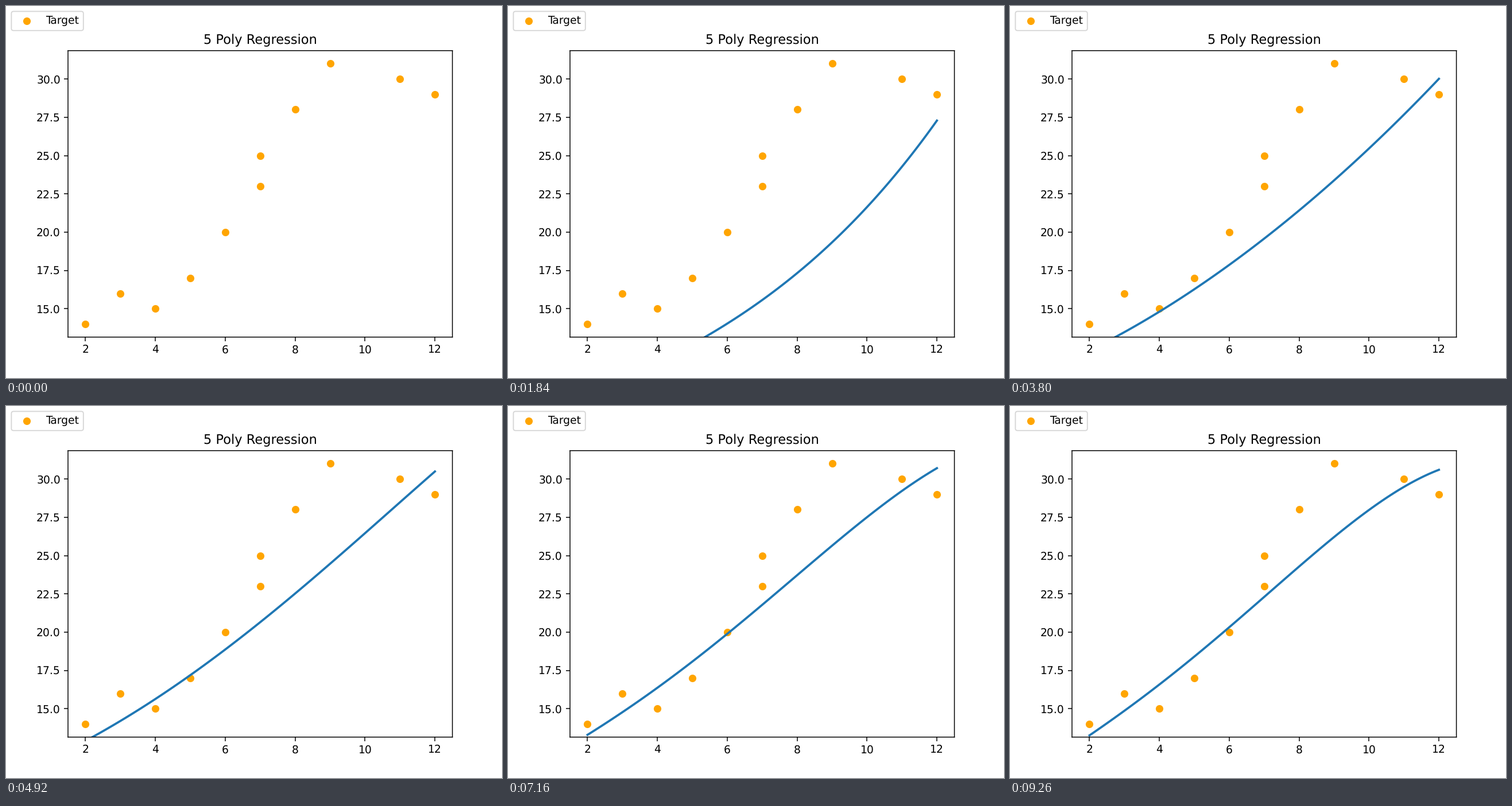
These frames come from a looping animation (864x648 px, 9280 ms). A matplotlib script:

```python
import numpy as np
import matplotlib.pyplot as plt
from matplotlib.animation import FuncAnimation

FRAMES, INTERVAL = 464, 20

POINTS_X = [2, 3, 4, 5, 6, 7, 7, 8, 9, 11, 12]
POINTS_Y = [14, 16, 15, 17, 20, 23, 25, 28, 31, 30, 29]

# Key fits: one row per training step, one column per node
NODES = np.linspace(2, 12, 5)
KEY_STEPS = np.array([3, 23, 58, 106, 199])
KEY_FITS = np.array([
    [-2.6, -0.7, 2.1, 7.0, 14.3],
    [7.4, 9.3, 12.16, 17.0, 24.46],
    [11.05, 13.98, 17.79, 22.65, 28.92],
    [12.9, 16.4, 20.65, 25.46, 30.49],
    [13.26, 17.48, 22.3, 27.12, 30.6],
])


def lagrange(at, knots):
    """Weights of the polynomial through the knots, one row per place."""
    size = len(knots)
    return np.vander(at, size) @ np.linalg.inv(np.vander(knots, size))


def remaining(step):
    """Share of the training error left, falling from one towards zero."""
    return 30 / (30 + step)


def step_at(frame):
    """Three training steps are shown in every seven ticks."""
    cycle, tick = divmod(frame, 7)
    return 3 * cycle + (tick >= 1) + (tick >= 6)


curve_x = np.linspace(2, 12, 100)
steps = np.arange(step_at(FRAMES - 1) + 1)
curves = (lagrange(remaining(steps), remaining(KEY_STEPS))
          @ KEY_FITS
          @ lagrange(curve_x - 7, NODES - 7).T)

# Soft edges: nothing is rounded to whole pixels
plt.rcParams.update({"path.snap": False, "text.hinting": "no_hinting"})

fig, ax = plt.subplots(figsize=(6.4, 4.8), dpi=135)
ax.scatter(POINTS_X, POINTS_Y, color="orange", label="Target")
ax.set_xlim(1.5, 12.5)
ax.set_ylim(13.15, 31.85)
ax.set_title("5 Poly Regression")
fig.legend(loc="upper left")
line, = ax.plot([], [], color="tab:blue", lw=2)


def update(frame):
    line.set_data(curve_x, curves[step_at(frame)])
    return line,


anim = FuncAnimation(fig, update, frames=FRAMES, interval=INTERVAL,
                     init_func=lambda: update(0), blit=True,
                     repeat=True, repeat_delay=0)
plt.show()
```
